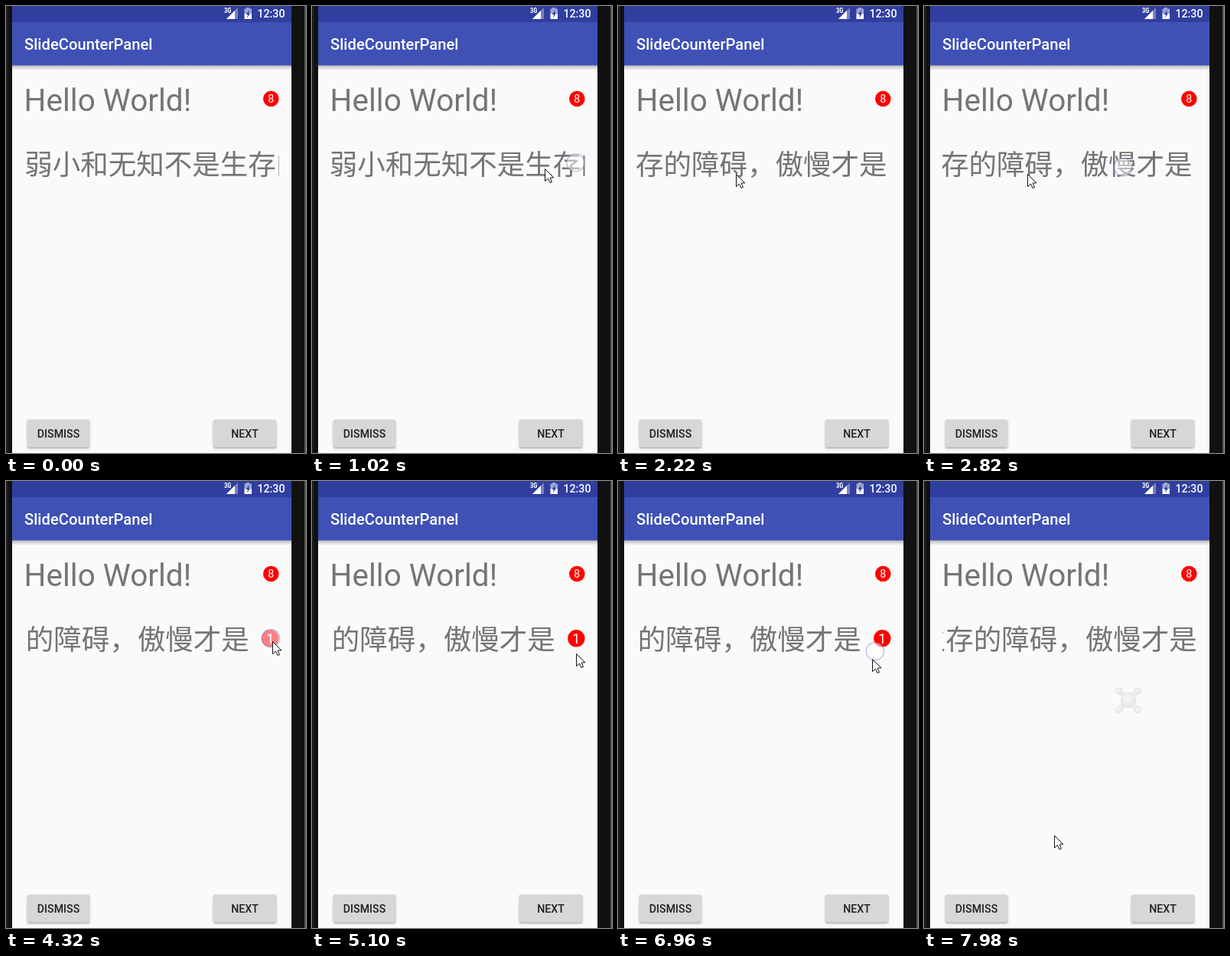
Write an HTML page with a canvas that moves like this. It is 392 px wide and 583 px high and loops after 8000 ms.

```html
<!DOCTYPE html>
<html lang="en">
<head>
<meta charset="utf-8">
<title>Badge drag demo</title>
<style>
html, body { margin: 0; width: 100%; height: 100%; overflow: hidden; background: #111; }
canvas { display: block; width: 392px; height: 583px; }
</style>
</head>
<body>
<canvas id="stage"></canvas>
<script>
const W = 392, H = 583, LOOP = 8000, STEP = 60;
const canvas = document.getElementById('stage');
const dpr = window.devicePixelRatio || 1;
canvas.width = W * dpr;
canvas.height = H * dpr;
const ctx = canvas.getContext('2d');

const ROBOTO = 'Roboto, sans-serif';
const CJK = '"Noto Sans CJK SC", "Noto Sans CJK", sans-serif';
const RED = '#ff0000', GREY = '#757575', BAR = '#303f9f';
const HOME = { x: 345.3, y: 205.3 };
const BADGE_R = 11.2, MAX_SCROLL = 327, END_SCROLL = 288, SNAP = 90;
const LAG = 100; // the touch trails the pointer

// The pointer presses at `from`, pulls, then drifts to the next gesture.
// A gesture with `scroll` moves the quote, one with `grab` pulls the badge.
const gestures = [
  { at: 420, from: [320, 134], pull: [0, 0], time: 0 },
  { at: 900, from: [348, 208], pull: [-140, 14], time: 320, scroll: 139.5 },
  { at: 1740, from: [287, 233], pull: [-140, -14], time: 320, scroll: 293.3 },
  { at: 2700, from: [268, 214], pull: [-205, 8], time: 200, scroll: MAX_SCROLL },
  { at: 4320, from: [348, 209], pull: [-3, 38], time: 320, grab: true },
  { at: 5220, from: [345, 225], pull: [-28, -69], time: 320, grab: true },
  { at: 6060, from: [345, 225], pull: [-28, -69], time: 320, grab: true },
  { at: 6840, from: [338, 226], pull: [-69, 64], time: 660, grab: true },
  { at: 8100, from: [170, 462], pull: [0, 0], time: 0 }
];
const swipes = gestures.filter(g => g.scroll);
const grabs = gestures.filter(g => g.grab);

const clamp = v => Math.max(0, Math.min(1, v));
const smooth = u => u * u * (3 - 2 * u);
const mix = (a, b, u) => a + (b - a) * u;
const progress = (t, from, to) => smooth(clamp((t - from) / (to - from)));
const release = g => g.at + g.time + LAG;
const BURST = release(grabs[grabs.length - 1]);

function pointerAt(t) {
  const i = Math.max(0, gestures.findIndex(g => g.at > t) - 1);
  const g = gestures[i], next = gestures[i + 1];
  const pulled = g.time ? progress(t, g.at, g.at + g.time) : 0;
  const drift = progress(t, g.time ? release(g) : g.at, next.at - 120);
  const [x, y] = g.from.map((v, n) => mix(v + g.pull[n] * pulled, next.from[n], drift));
  return { x, y };
}

function touchAt(t) {
  const p = pointerAt(t - LAG);
  return { x: p.x - 2, y: p.y - 4 };
}

function scrollAt(t) {
  if (t >= BURST) return END_SCROLL;
  return swipes.reduce(
    (pos, g) => mix(pos, g.scroll, progress(t - LAG, g.at, g.at + g.time)), 0);
}

function isTouching(t) {
  return [...swipes, ...grabs].some(g => t >= g.at && t < release(g));
}

function badgeAt(t) {
  const g = grabs.find(g => t >= g.at && t < release(g) + 300);
  if (!g) return { ...HOME, held: false };
  const back = (t - release(g)) / 300;
  const held = back < 0;
  const p = touchAt(Math.min(t, release(g)));
  const pull = held
    ? progress(t, g.at + 120, g.at + 240)
    : (1 - back) ** 3 * Math.cos(3 * Math.PI * back);
  return { x: mix(HOME.x, p.x, pull), y: mix(HOME.y, p.y, pull), held };
}

function rect(x, y, w, h, color) {
  ctx.fillStyle = color;
  ctx.fillRect(x, y, w, h);
}

function disc(x, y, r, color) {
  ctx.fillStyle = color;
  ctx.beginPath();
  ctx.arc(x, y, r, 0, 7);
  ctx.fill();
}

function shape(points, color) {
  ctx.fillStyle = color;
  ctx.beginPath();
  points.forEach(([x, y]) => ctx.lineTo(x, y));
  ctx.closePath();
  ctx.fill();
}

function label(text, x, y, font, color, align = 'left') {
  ctx.font = font;
  ctx.fillStyle = color;
  ctx.textAlign = align;
  ctx.fillText(text, x, y);
}

function badge(x, y, r, text, size) {
  disc(x, y, r, RED);
  label(text, x, y + size * 0.36, `${size}px ${ROBOTO}`, '#fff', 'center');
}

function button(text, x, w) {
  ctx.save();
  ctx.shadowColor = 'rgba(0,0,0,.35)';
  ctx.shadowBlur = 3 * dpr;
  ctx.shadowOffsetY = 1.5 * dpr;
  ctx.fillStyle = '#d6d7d7';
  ctx.beginPath();
  ctx.roundRect(x, 539.5, w, 36, 2);
  ctx.fill();
  ctx.restore();
  label(text, x + w / 2, 563, `500 14.2px ${ROBOTO}`, '#212121', 'center');
}

function statusIcons() {
  shape([[288, 17], [303, 17], [303, 2]], 'rgba(255,255,255,.35)');
  shape([[288, 17], [299, 17], [299, 6]], '#fff');
  rect(284, 1, 11, 9, BAR);
  label('3G', 285, 9, `700 8.5px "Roboto Condensed", ${ROBOTO}`, '#fff');
  rect(314, 2, 4, 2, '#9fa7d2');
  rect(311.5, 3.5, 9.5, 6.5, '#9fa7d2');
  rect(311.5, 10, 9.5, 7, '#fff');
  shape([[318, 5], [313.5, 11], [316, 11], [315, 15.5], [319, 9.5], [317, 9.5]], BAR);
}

function screen() {
  rect(0, 0, W, H, '#111');
  rect(0, 0, 3, H, '#1c1c1c');
  rect(390, 0, 2, H, '#5a5a5a');
  rect(8, 0, 365, H, '#fafafa');
  const shadow = ctx.createLinearGradient(0, 77, 0, 84);
  shadow.addColorStop(0, 'rgba(0,0,0,.28)');
  shadow.addColorStop(1, 'rgba(0,0,0,0)');
  rect(8, 77, 365, 7, shadow);
  rect(8, 0, 365, 21, BAR);
  rect(8, 21, 365, 56.5, '#3f51b5');
  statusIcons();
  label('12:30', 364.5, 14.5, `500 14.2px ${ROBOTO}`, '#fff', 'right');
  label('SlideCounterPanel', 24, 57, `500 20.2px ${ROBOTO}`, '#fff');
  label('Hello World!', 23.6, 137, `40.5px ${ROBOTO}`, GREY);
  badge(346.3, 121, 10.3, '8', 14.2);
  button('DISMISS', 28, 81);
  button('NEXT', 271, 82);
}

function quote(scroll, hasBadge) {
  ctx.save();
  ctx.beginPath();
  ctx.rect(24, 180, 332.5, 60);
  ctx.clip();
  label('弱小和无知不是生存的障碍，傲慢才是', 24.2 - scroll, 220, `36.5px ${CJK}`, GREY);
  if (hasBadge) badge(HOME.x + MAX_SCROLL - scroll, HOME.y, BADGE_R, '1', 18.5);
  ctx.restore();
}

// Elastic neck between the anchor and the pulled badge
function neck(b) {
  const dx = b.x - HOME.x, dy = b.y - HOME.y, d = Math.hypot(dx, dy);
  if (d < 3 || d > SNAP) return;
  const r = Math.max(3, BADGE_R * (1 - d / 120));
  const nx = -dy / d, ny = dx / d;
  const mx = HOME.x + dx / 2, my = HOME.y + dy / 2;
  disc(HOME.x, HOME.y, r, RED);
  ctx.beginPath();
  ctx.moveTo(HOME.x + nx * r, HOME.y + ny * r);
  ctx.quadraticCurveTo(mx, my, b.x + nx * BADGE_R, b.y + ny * BADGE_R);
  ctx.lineTo(b.x - nx * BADGE_R, b.y - ny * BADGE_R);
  ctx.quadraticCurveTo(mx, my, HOME.x - nx * r, HOME.y - ny * r);
  ctx.fill();
}

function puff(x, y, r) {
  const g = ctx.createRadialGradient(x - r * 0.3, y - r * 0.4, 0, x, y, r);
  g.addColorStop(0, '#f6f6f6');
  g.addColorStop(0.75, '#ebebeb');
  g.addColorStop(1, '#dedede');
  disc(x, y, r, g);
}

function burst(t) {
  const { x, y } = touchAt(BURST);
  const u = clamp((t - BURST) / 380);
  const spread = mix(5, 17, Math.sqrt(u));
  for (let i = 0; i < 4; i++) {
    const a = Math.PI / 4 + i * Math.PI / 2;
    const dx = Math.cos(a) * spread, dy = Math.sin(a) * spread;
    puff(x + dx * 0.7, y + dy * 0.7, mix(7, 3, u));
    puff(x + dx, y + dy, mix(8, 4.8, u));
  }
  puff(x, y, mix(13, 10, u));
}

function touchRing({ x, y }) {
  disc(x, y, 11.5, 'rgba(255,255,255,.5)');
  ctx.strokeStyle = 'rgba(125,125,190,.45)';
  ctx.lineWidth = 1.5;
  ctx.stroke();
}

function pointer({ x, y }) {
  ctx.save();
  ctx.translate(Math.round(x) + 0.5, Math.round(y) + 0.5);
  shape([[0, 0], [0, 16], [4, 12.5], [6.5, 18], [9, 17], [6.6, 11.5], [11.3, 11.3]], '#fff');
  ctx.strokeStyle = '#111';
  ctx.lineWidth = 1;
  ctx.stroke();
  ctx.restore();
}

function draw(t) {
  ctx.setTransform(dpr, 0, 0, dpr, 0, 0);
  screen();
  const gone = t >= BURST;
  const scroll = scrollAt(t);
  const loose = !gone && scroll >= MAX_SCROLL;
  quote(scroll, !gone && !loose);
  if (loose) {
    const b = badgeAt(t);
    if (b.held) neck(b);
    badge(b.x, b.y, BADGE_R, '1', 18.5);
  }
  if (gone) burst(t);
  if (isTouching(t)) touchRing(touchAt(t));
  if (t >= gestures[0].at) pointer(pointerAt(t));
}

const start = performance.now();
function tick() {
  const t = (performance.now() - start) % LOOP;
  draw(Math.floor(t / STEP) * STEP);
  requestAnimationFrame(tick);
}
tick();
</script>
</body>
</html>
```
